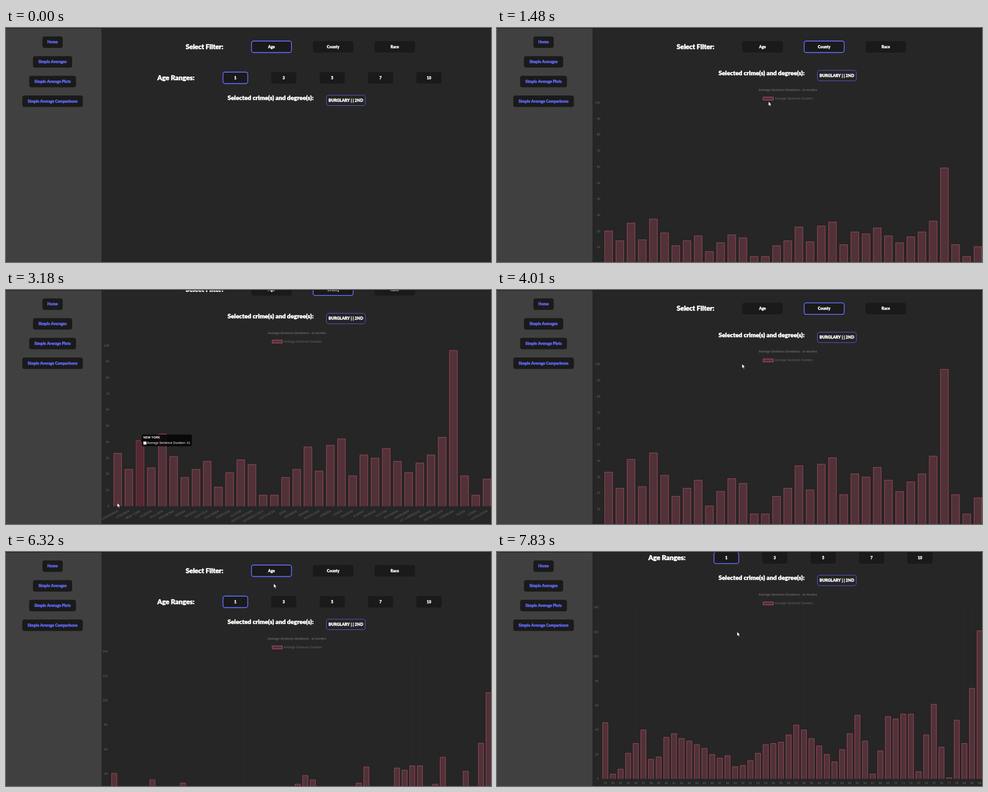
Animation, 1077 px wide and 520 px high, one loop 8000 ms. Source, as an HTML page with a canvas:

```html
<!DOCTYPE html>
<html lang="en">
<head>
<meta charset="utf-8">
<title>Average Sentence Durations</title>
<style>
  html, body { margin: 0; width: 100%; height: 100%; overflow: hidden; background: #262626; }
  canvas { display: block; width: 1077px; height: 520px; }
</style>
</head>
<body>
<canvas id="stage" width="1077" height="520"></canvas>
<script>
const ctx = document.getElementById('stage').getContext('2d');
const W = 1077, H = 520, LOOP = 8000, SIDE = 212;
const ACCENT = '#646cff', BUTTON = '#1a1a1a', GREY = '#666';
const BRAND = 'Lato, "Open Sans", sans-serif';
const PLAIN = '"Liberation Sans", Arial, sans-serif';
const CHART_FONT = `6.9px ${PLAIN}`, CHART_BOLD = `bold 6.75px ${PLAIN}`;

// Times of the two clicks and the press before the second one
const COUNTY_AT = 1270, PRESS_AT = 5780, AGE_AT = 5910;

const clamp = v => Math.max(0, Math.min(1, v));
const easeOut = (p, n) => 1 - Math.pow(1 - clamp(p), n);
const lerp = (a, b, p) => a + (b - a) * p;

// Linear interpolation through rows of [position, ...values]
function along(rows, at) {
  const i = rows.findIndex(r => r[0] > at);
  if (i < 0) return rows[rows.length - 1].slice(1);
  const a = rows[i - 1], b = rows[i], p = (at - a[0]) / (b[0] - a[0]);
  return a.slice(1).map((v, k) => lerp(v, b[k + 1], p));
}

function random(seed) {
  return () => (seed = seed * 16807 % 2147483647) / 2147483647;
}

// Bars that follow a few turning points, uneven in between
function uneven(points, count, spread) {
  const rnd = random(11);
  return Array.from({ length: count }, (_, i) => {
    const fixed = points.some(p => p[0] === i);
    const noise = fixed ? 0 : (rnd() - 0.5) * spread;
    return Math.max(1, Math.round(along(points, i)[0] + noise));
  });
}

const county = {
  names: ('ONONDAGA,STEUBEN,NEW YORK,QUEENS,SULLIVAN,RICHMOND,BRONX,NASSAU,SUFFOLK,COLUMBIA,' +
    'TOMPKINS,ULSTER,WESTCHESTER,SCHENECTADY,DUTCHESS,ERIE,MONROE,WAYNE,ROCKLAND,ONEIDA,KINGS,' +
    'ONTARIO,ALBANY,ORANGE,FULTON,WYOMING,HERKIMER,ST. LAWRENCE,BROOME,RENSSELAER,CHEMUNG,' +
    'YATES,LEWIS,LIVINGSTON').split(','),
  values: [33, 23, 41, 24, 45, 31, 18, 23, 28, 12, 21, 29, 26, 7, 7, 18, 23, 37, 22, 38, 42,
    19, 32, 30, 36, 28, 21, 27, 32, 43, 97, 19, 7, 17],
  first: 248, pitch: 24.85, max: 100, tick: 10, tickX: 229.3, height: 357.2, tilt: 28, start: COUNTY_AT
};
const age = {
  names: [29, 30, 32, 33, 36, ...Array.from({ length: 42 }, (_, i) => 37 + i), 84, 85, 88].map(String),
  values: uneven([[0, 46], [1, 4], [5, 40], [6, 16], [9, 37], [18, 11], [25, 44], [30, 14], [33, 52],
    [35, 4], [37, 51], [40, 53], [41, 6], [43, 61], [45, 1], [46, 48], [47, 29], [49, 121]], 50, 10),
  first: 240.3, pitch: 16.97, max: 140, tick: 20, tickX: 225.5, height: 381, tilt: 0, start: AGE_AT
};

// time, x, y
const path = [
  [180, 957, 490], [950, 707, 40], [1270, 709, 40], [1480, 603, 163], [2900, 345, 440],
  [3180, 247, 473], [3450, 240, 478], [3720, 544, 164], [4060, 544, 164], [4280, 567, 150],
  [5000, 576, 129], [5400, 602, 47], [5920, 602, 47], [6800, 585, 97], [7700, 533, 177]
];
// start, end, distance
const scrolls = [[2010, 2240, 42.3], [3830, 4060, -42.3], [6430, 6650, 57.8], [7640, 7840, 40]];

const pointer = t => t < path[0][0] ? null : along(path, t);
const scrollAt = t => scrolls.reduce((y, [a, b, d]) => y + d * easeOut((t - a) / (b - a), 3), 0);

function text(str, x, y, font, color, align = 'center') {
  ctx.font = font;
  ctx.fillStyle = color;
  ctx.textAlign = align;
  ctx.textBaseline = 'middle';
  ctx.fillText(str, x, y);
}

// Heavy face: a thin outline thickens the letters
function brand(str, x, y, size, color = '#fff', align = 'center') {
  text(str, x, y, `900 ${size}px ${BRAND}`, color, align);
  ctx.strokeStyle = color;
  ctx.lineWidth = size * 0.045;
  ctx.lineJoin = 'round';
  ctx.strokeText(str, x, y);
}

function box(x, y, w, h, r) {
  ctx.beginPath();
  ctx.roundRect(x, y, w, h, r);
}

// line: 0 none, 1 thin, 2 thick border
function button(label, x, y, w, h, line = 0, color = '#fff', fill = BUTTON, size = 8.5) {
  box(x, y, w, h, 4.5);
  ctx.fillStyle = fill;
  ctx.fill();
  if (line) {
    box(x + 0.5, y, w - 1, h, 4.5);
    ctx.lineWidth = line === 2 ? 1.8 : 0.9;
    ctx.strokeStyle = ACCENT;
    ctx.stroke();
  }
  brand(label, x + w / 2, y + h / 2 + 0.3, size, color);
}

function sidebar() {
  ctx.fillStyle = '#404040';
  ctx.fillRect(0, 0, SIDE, H);
  const links = [['Home', 45], ['Simple Averages', 87], ['Simple Average Plots', 104],
    ['Simple Average Comparisons', 134.5]];
  links.forEach(([label, w], i) =>
    button(label, 103.4 - w / 2, 18.7 + i * 43.8, w, 25.5, 0, ACCENT));
}

function filters(t, isAge, mouse, scroll) {
  const y = 29 - scroll, w = 89.8, h = 25.5;
  const pressed = !isAge && t >= PRESS_AT;
  let over = false;
  brand('Select Filter:', 399, 42.2 - scroll, 14.8, '#fff', 'left');
  ['Age', 'County', 'Race'].forEach((label, i) => {
    const x = 544.7 + i * 136.9;
    const hover = mouse && mouse[0] > x && mouse[0] < x + w && mouse[1] > y && mouse[1] < y + h;
    const selected = i === (isAge ? 0 : 1);
    const focused = pressed ? i === 0 : selected;
    over = over || hover;
    button(label, x, y, w, h, focused ? 2 : hover || selected ? 1 : 0);
  });
  return over;
}

function ranges(scroll) {
  brand('Age Ranges:', 336, 111 - scroll, 15, '#fff', 'left');
  [1, 3, 5, 7, 10].forEach((n, i) =>
    button(String(n), 481.3 + i * 107.5, 98 - scroll, 56, 25.5, i ? 0 : 2));
}

function crimes(y) {
  brand('Selected crime(s) and degree(s):', 492, y, 13.6, '#fff', 'left');
  button('BURGLARY | | 2ND', 711, y - 6.7, 87.4, 23.2, 1, '#fff', '#242426', 8.9);
}

function rule(x0, y0, x1, y1) {
  ctx.beginPath();
  ctx.moveTo(x0, y0);
  ctx.lineTo(x1, y1);
  ctx.stroke();
}

function bar(x, y, w, base, hover) {
  const line = 0.56, l = x + line / 2, r = x + w - line / 2;
  ctx.fillStyle = hover ? 'rgba(255,62,103,0.2)' : 'rgba(255,99,132,0.2)';
  ctx.fillRect(x, y, w, base - y);
  ctx.strokeStyle = hover ? 'rgb(255,62,103)' : 'rgb(255,99,132)';
  ctx.lineWidth = line;
  ctx.lineJoin = 'miter';
  ctx.beginPath();
  ctx.moveTo(l, base);
  ctx.lineTo(l, y + line / 2);
  ctx.lineTo(r, y + line / 2);
  ctx.lineTo(r, base);
  ctx.stroke();
}

function tooltip(name, value, x, y) {
  const body = 'Average Sentence Duration: ' + value;
  ctx.font = CHART_FONT;
  const w = ctx.measureText(body).width + 15, left = x + 4, top = y - 13;
  ctx.fillStyle = 'rgba(0,0,0,0.8)';
  box(left, top, w, 26, 3.4);
  ctx.moveTo(left, y - 2.8);
  ctx.lineTo(left - 2.8, y);
  ctx.lineTo(left, y + 2.8);
  ctx.fill();
  text(name, left + 3.4, top + 7, CHART_BOLD, '#fff', 'left');
  ctx.fillStyle = '#fff';
  ctx.fillRect(left + 3.4, top + 15.6, 6.75, 6.75);
  ctx.fillStyle = '#ffe0e6';
  ctx.fillRect(left + 4, top + 16.2, 5.6, 5.6);
  text(body, left + 11.3, top + 19, CHART_FONT, '#fff', 'left');
}

// top is the y of the chart title
function chart(c, t, top) {
  const axis = top + 27.7, base = axis + c.height, unit = c.height / c.max;
  const grow = easeOut((t - c.start) / 1000, 4);
  text('Average Sentence Durations - in months', 646, top, CHART_BOLD, GREY);
  box(591, top + 15.5, 22.5, 6.75, 0);
  ctx.fillStyle = 'rgba(255,99,132,0.2)';
  ctx.fill();
  ctx.strokeStyle = 'rgba(255,99,132,0.75)';
  ctx.lineWidth = 1;
  ctx.stroke();
  text('Average Sentence Duration', 617, top + 18.9, CHART_FONT, GREY, 'left');

  const left = c.first - c.pitch / 2;
  ctx.strokeStyle = 'rgba(0,0,0,0.06)';
  ctx.lineWidth = 0.6;
  for (let v = 0; v <= c.max; v += c.tick) {
    const y = base - v * unit;
    rule(left - 4, y, W, y);
    text(String(v), c.tickX, y + 0.3, CHART_FONT, GREY, 'right');
  }
  c.names.forEach((_, i) => rule(left + i * c.pitch, axis, left + i * c.pitch, base + 4));

  // Hover reacts slightly behind the pointer
  const m = pointer(t - 130), bw = c.pitch * 0.72;
  let active = -1;
  c.values.forEach((v, i) => {
    const x = c.first + i * c.pitch, y = base - v * unit * grow;
    const hover = m && Math.abs(m[0] - x) < bw / 2 && m[1] > y && m[1] < base;
    if (hover) active = i;
    bar(x - bw / 2, y, bw, base, hover);
    ctx.save();
    ctx.translate(x + (c.tilt ? 1 : 0), base + 10.2);
    ctx.rotate(-c.tilt * Math.PI / 180);
    text(c.names[i], 0, 0, CHART_FONT, GREY, c.tilt ? 'right' : 'center');
    ctx.restore();
  });
  if (active >= 0) {
    const v = c.values[active];
    tooltip(c.names[active], v, c.first + active * c.pitch, base - v * unit * grow);
  }
}

function shape(points) {
  ctx.beginPath();
  points.forEach(([x, y]) => ctx.lineTo(x, y));
  ctx.closePath();
  ctx.fill();
  ctx.stroke();
}

function drawPointer(x, y, kind) {
  ctx.save();
  ctx.translate(x, y);
  ctx.fillStyle = '#fff';
  ctx.strokeStyle = '#000';
  ctx.lineWidth = 0.7;
  ctx.lineJoin = 'round';
  if (kind === 'hand') {
    shape([[-1, 1], [0, 0], [1.2, 1], [1.3, 4.2], [6, 5.5], [5, 12.5], [-0.5, 12.5], [-4, 8], [-1, 8]]);
  } else if (kind === 'text') {
    ctx.strokeStyle = '#ddd';
    ctx.lineWidth = 1;
    rule(0, -6, 0, 6);
    rule(-2, -6, 2, -6);
    rule(-2, 6, 2, 6);
  } else {
    shape([[0, 0], [0, 10], [2.3, 8], [4, 11.6], [5.6, 10.9], [4, 7.4], [7.1, 7.2]]);
  }
  ctx.restore();
}

function draw(t) {
  const isAge = t < COUNTY_AT || t >= AGE_AT;
  const scroll = scrollAt(t), mouse = pointer(t);
  ctx.fillStyle = '#262626';
  ctx.fillRect(0, 0, W, H);
  sidebar();

  ctx.save();
  ctx.beginPath();
  ctx.rect(SIDE, 0, W - SIDE, H);
  ctx.clip();
  const overButton = filters(t, isAge, mouse, scroll);
  if (isAge) ranges(scroll);
  const headY = (isAge ? 156 : 100.8) - scroll;
  crimes(headY);
  if (t >= COUNTY_AT) chart(isAge ? age : county, t, headY + 37.2);
  ctx.restore();

  ctx.fillStyle = '#141414';
  ctx.fillRect(0, 0, W, 1);

  if (mouse) {
    const [x, y] = mouse;
    const overText = x > 492 && x < 683 && Math.abs(y - headY) < 9;
    drawPointer(x, y, overButton ? 'hand' : overText ? 'text' : 'arrow');
  }
}

const begin = performance.now();
function frame() {
  draw((performance.now() - begin) % LOOP);
  requestAnimationFrame(frame);
}
frame();
</script>
</body>
</html>
```
